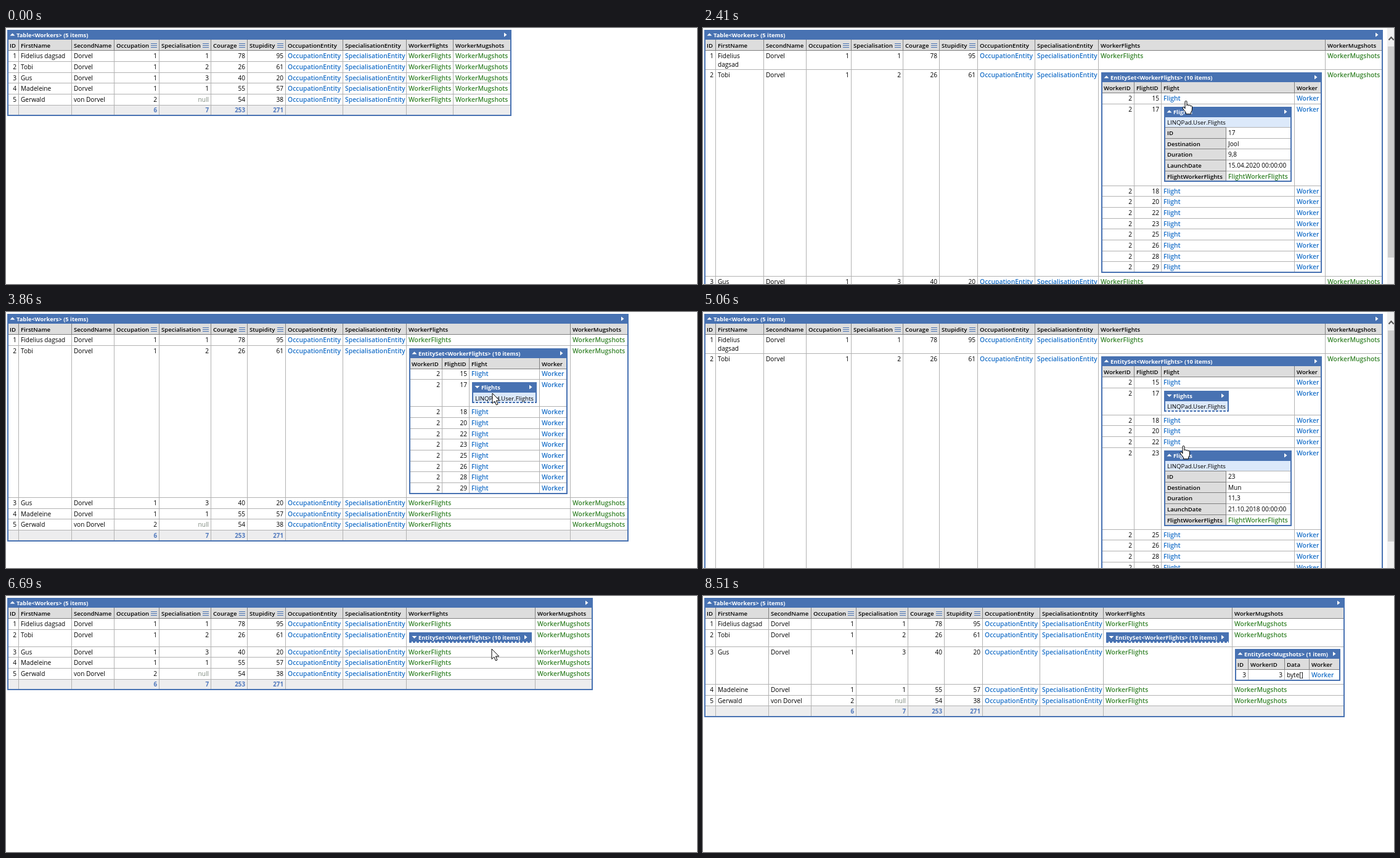
Write an HTML page that moves like this. It is 1121 px wide and 416 px high and loops after 9.32 s.

```html
<!DOCTYPE html>
<html lang="en">
<head>
<meta charset="utf-8">
<title>Workers table</title>
<style>
  html, body { margin: 0; width: 100%; height: 100%; overflow: hidden; background: #fff; }
  svg { display: block; }
  text { font: 10.1px 'Open Sans', 'Noto Sans', sans-serif; fill: #000; }
  .head { font-weight: 600; font-size: 9.6px; }
  .bar { font-weight: 700; font-size: 9.3px; fill: #fff; }
  .type { font-size: 9.7px; }
  .blue, .green { font-weight: 600; font-size: 10.35px; }
  .blue { fill: #1a70c8; }
  .green { fill: #37842c; }
  .null { fill: #7b877b; }
  .sum { fill: #5179bd; font-weight: 700; font-size: 9.8px; }
  .hover { text-decoration: underline; }
  .end { text-anchor: end; }
</style>
</head>
<body>
<svg width="1121" height="416" viewBox="0 0 1121 416">
  <g id="page"></g>
  <path id="cursor" fill="#fff" stroke="#000" stroke-linejoin="round"/>
</svg>
<script>
const LOOP = 9320, ROW = 17.7, BLUE = '#4872b2', DARK = '#808080', LINE = '#b2b2b2';
const page = document.getElementById('page');
const cursor = document.getElementById('cursor');

// Cursor outlines, with the hot spot at 0,0
const SHAPES = {
  arrow: 'M0 0V16.5L3.8 13L6.4 19L9 17.9L6.4 12H11.7Z',
  hand: 'M-2 13V2q0-1.5 1.5-1.5T1 2v6q.2-1.2 1.5-1.2t1.5 1.6q.2-1 1.5-1t1.4 1.8q.3-.8 1.4-.8' +
        't1.2 1.6V14q0 3-2 5v2.8H-.5V19.5L-5.5 13q-1-1.5.2-2.3t2.2.5z'
};

// View: 0 start, 1 set open, 2 first flight open, 3 it is folded,
// 4 second flight open, 5 set folded, 6 mugshots open
const SPLIT = [725, 858, 1009, 915, 1009, 858, 858];
const RIGHT = [820, 952, 1103, 1010, 1103, 952, 1041];

// Time, view, cursor, x, y, hovered link
const STEPS = [
  [0, 0],
  [400, 0, 'hand', 686, 46, 'flights1'],
  [600, 0, 'hand', 687, 53, 'flights1'],
  [800, 0, 'hand', 687, 59, 'flights2'],
  [1200, 1, 'arrow', 687, 59],
  [1610, 1, 'arrow', 712, 76],
  [1810, 1, 'arrow', 744, 97],
  [2010, 1, 'hand', 773, 113, 'flight17'],
  [2210, 1, 'hand', 783, 118, 'flight17'],
  [2410, 2, 'hand', 784, 118],
  [2810, 2, 'hand', 784, 121],
  [3010, 2, 'arrow', 786, 128],
  [3220, 2, 'arrow', 788, 136],
  [3420, 2, 'arrow', 789, 134],
  [3630, 2, 'arrow', 789, 132],
  [3860, 3, 'arrow', 789, 132],
  [4040, 3, 'arrow', 788, 145],
  [4240, 3, 'arrow', 786, 166],
  [4450, 3, 'arrow', 784, 188],
  [4670, 3, 'hand', 781, 206, 'flight22'],
  [4880, 3, 'hand', 780, 217, 'flight23'],
  [5060, 4, 'hand', 780, 217],
  [5670, 4, 'arrow', 746, 150],
  [5870, 4, 'arrow', 707, 78],
  [6290, 5, 'arrow', 707, 78],
  [6490, 5, 'arrow', 738, 82],
  [6690, 5, 'arrow', 788, 86],
  [6890, 5, 'arrow', 838, 88],
  [7090, 5, 'hand', 869, 87, 'mugshots3'],
  [7290, 5, 'hand', 882, 85, 'mugshots3'],
  [7500, 5, 'hand', 886, 90, 'mugshots3'],
  [7890, 6, 'hand', 886, 90],
  [8510, 6]
];

let svg, hover;

function rect(x, y, right, bottom, fill) {
  y = Math.round(y);
  svg += `<rect x="${x}" y="${y}" width="${right - x}" height="${Math.round(bottom) - y}" fill="${fill}"/>`;
}

function text(x, mid, s, cls = '') {
  svg += `<text x="${x}" y="${Math.round(mid) + 4}" class="${cls}">${s}</text>`;
}

function path(d, fill, more = '') {
  svg += `<path d="${d}" fill="${fill}" ${more}/>`;
}

function bar(x, top, right, title, open) {
  rect(x, top, right, top + 17, BLUE);
  const y = Math.round(top) + 6;
  path(open ? `M${x + 4.5} ${y + 3.5}h8l-4-4z` : `M${x + 4.5} ${y}h8l-4 4z`, '#fff');
  path(`M${right - 12} ${y - 1.5}v7l4.5-3.5z`, '#fff');
  text(x + 15, top + 8, title, 'bar');
}

function frame(x, top, right, bottom, folded) {
  rect(x, top, x + 2, bottom, BLUE);
  rect(right - 2, top, right, bottom, BLUE);
  if (!folded) return rect(x, bottom - 2, right, bottom, BLUE);
  rect(x, bottom - 2, right, bottom, '#fff');
  path(`M${x} ${Math.round(bottom) - 1}H${right}`, 'none', `stroke="${BLUE}" stroke-width="2" stroke-dasharray="4 2"`);
}

const link = (s, cls, id) => ({ s, cls, id });

// Draws one cell and returns the row height it needs
function cell(value, left, right, mid) {
  if (typeof value === 'function') return value(left + 5, mid - 4.1) + 10;
  if (value === null) text(right - 3, mid, 'null', 'null end');
  else if (typeof value === 'number') text(right - 3, mid, value, 'end');
  else if (value.cls) text(left + 4, mid, value.s, value.cls + (value.id === hover ? ' hover' : ''));
  else {
    const parts = value.split('\n');
    parts.forEach((s, i) => text(left + 4, mid + i * 13.6, s));
    return ROW + (parts.length - 1) * 13.6;
  }
  return ROW;
}

function table(top, edges, title, heads, rows, sums) {
  const x = edges[0], right = edges.at(-1);
  bar(x, top, right, title, true);
  rect(x, top + 16, right, top + 33, '#ddd');
  heads.forEach((name, i) => {
    text(edges[i] + 4, top + 24.9, name.replace('*', ''), 'head');
    if (name.endsWith('*'))
      for (const y of [22, 25, 28]) rect(edges[i + 1] - 13, top + y, edges[i + 1] - 3, top + y + 1, BLUE);
  });
  let y = top + 32.7;
  for (const row of rows) {
    const heights = row.map((v, i) => cell(v, edges[i], edges[i + 1], y + 9));
    y += Math.max(...heights);
    rect(x, y, right, y + 1, LINE);
  }
  if (sums) {
    rect(x, y + 1, right, y + ROW, '#ededee');
    sums.forEach((n, i) => text(edges[i + 4] - 3, y + 8.6, n, 'sum end'));
    y += ROW;
  }
  for (const e of edges.slice(1, -1)) {
    rect(e, top + 33, e + 1, y, LINE);
    rect(e, top + 16, e + 1, top + 33, DARK);
  }
  rect(x, top + 33, right, top + 34, DARK);
  frame(x, top, right, y + 1);
  return y + 1 - top;
}

const flight = (open, ...values) => (x, top) => {
  const right = x + (open ? 207 : 105);
  bar(x, top, right, 'Flights', open);
  rect(x, top + 17, right, top + 34, '#dce9fa');
  text(x + 5, top + 25.5, 'LINQPad.User.Flights', 'type');
  let height = 34;
  if (open) {
    let y = top + 33.3;
    ['ID', 'Destination', 'Duration', 'LaunchDate', 'FlightWorkerFlights'].forEach((name, i) => {
      rect(x, y, x + 100, y + ROW, '#ddd');
      rect(x, y, x + 100, y + 1, DARK);
      rect(x + 100, y, right, y + 1, LINE);
      rect(x + 100, y, x + 101, y + ROW, DARK);
      text(x + 5, y + 9, name, 'head');
      cell(values[i] ?? link(name, 'green'), x + 100, right, y + 9);
      y += ROW;
    });
    height = y + 1 - top;
  }
  frame(x, top, right, top + height, !open);
  return height;
};

const SET_TITLE = 'EntitySet&lt;WorkerFlights&gt; (10 items)';

function flightSet(view) {
  if (view > 4) return (x, top) => {
    bar(x, top, x + 199, SET_TITLE, false);
    frame(x, top, x + 199, top + ROW, true);
    return ROW;
  };
  const offsets = view === 1 ? [0, 59, 109, 149, 199]
    : view === 3 ? [0, 53, 97, 211, 257] : [0, 53, 97, 313, 358];
  const rows = [15, 17, 18, 20, 22, 23, 25, 26, 28, 29].map(id => {
    let item = link('Flight', 'blue', 'flight' + id);
    if (id === 17 && view > 1) item = flight(view === 2, '17', 'Jool', '9,8', '15.04.2020 00:00:00');
    if (id === 23 && view === 4) item = flight(true, '23', 'Mun', '11,3', '21.10.2018 00:00:00');
    return [2, id, item, link('Worker', 'blue')];
  });
  return (x, top) => table(top, offsets.map(o => x + o), SET_TITLE,
    ['WorkerID', 'FlightID', 'Flight', 'Worker'], rows);
}

const mugshots = (x, top) => table(top, [0, 21, 80, 120, 171].map(o => x + o),
  'EntitySet&lt;Mugshots&gt; (1 item)', ['ID', 'WorkerID', 'Data', 'Worker'],
  [[3, 3, 'byte[]', link('Worker', 'blue')]]);

function draw(view) {
  const narrow = view === 2 || view === 4;
  const inner = [106, 175, 248, 332, 391, 453, 546, 649].map(e => e - (narrow ? 8 : 0));
  const people = [
    [narrow ? 'Fidelius\ndagsad' : 'Fidelius dagsad', 'Dorvel', 1, 1, 78, 95],
    ['Tobi', 'Dorvel', 1, 2, 26, 61],
    ['Gus', 'Dorvel', 1, 3, 40, 20],
    ['Madeleine', 'Dorvel', 1, 1, 55, 57],
    ['Gerwald', 'von Dorvel', 2, null, 54, 38]
  ];
  const rows = people.map((p, i) => [i + 1, ...p,
    link('OccupationEntity', 'blue'),
    link('SpecialisationEntity', 'blue'),
    i === 1 && view > 0 ? flightSet(view) : link('WorkerFlights', 'green', 'flights' + (i + 1)),
    i === 2 && view === 6 ? mugshots : link('WorkerMugshots', 'green', 'mugshots' + (i + 1))]);
  svg = '';
  table(3.45, [2, 20, ...inner, SPLIT[view], RIGHT[view]], 'Table&lt;Workers&gt; (5 items)',
    ['ID', 'FirstName', 'SecondName', 'Occupation*', 'Specialisation*', 'Courage*', 'Stupidity*',
      'OccupationEntity', 'SpecialisationEntity', 'WorkerFlights', 'WorkerMugshots'],
    rows, [6, 7, 253, 271]);
  if (narrow) {
    rect(1110, 0, 1121, 416, '#f0f0f0');
    rect(1111, 30, 1121, 373, '#cdcdcd');
    path('M1112.5 19.5l4-4.5l4 4.5', 'none', 'stroke="#555" stroke-width="2"');
  }
  page.innerHTML = svg;
}

let shown;
function tick(now) {
  const step = STEPS.findLast(s => s[0] <= now % LOOP);
  if (step !== shown) {
    shown = step;
    const [, view, shape, x, y, over] = step;
    hover = over || 'none';
    draw(view);
    cursor.setAttribute('d', SHAPES[shape] || '');
    cursor.setAttribute('transform', `translate(${x || 0} ${y || 0})`);
  }
  requestAnimationFrame(tick);
}
tick(0);
</script>
</body>
</html>
```
